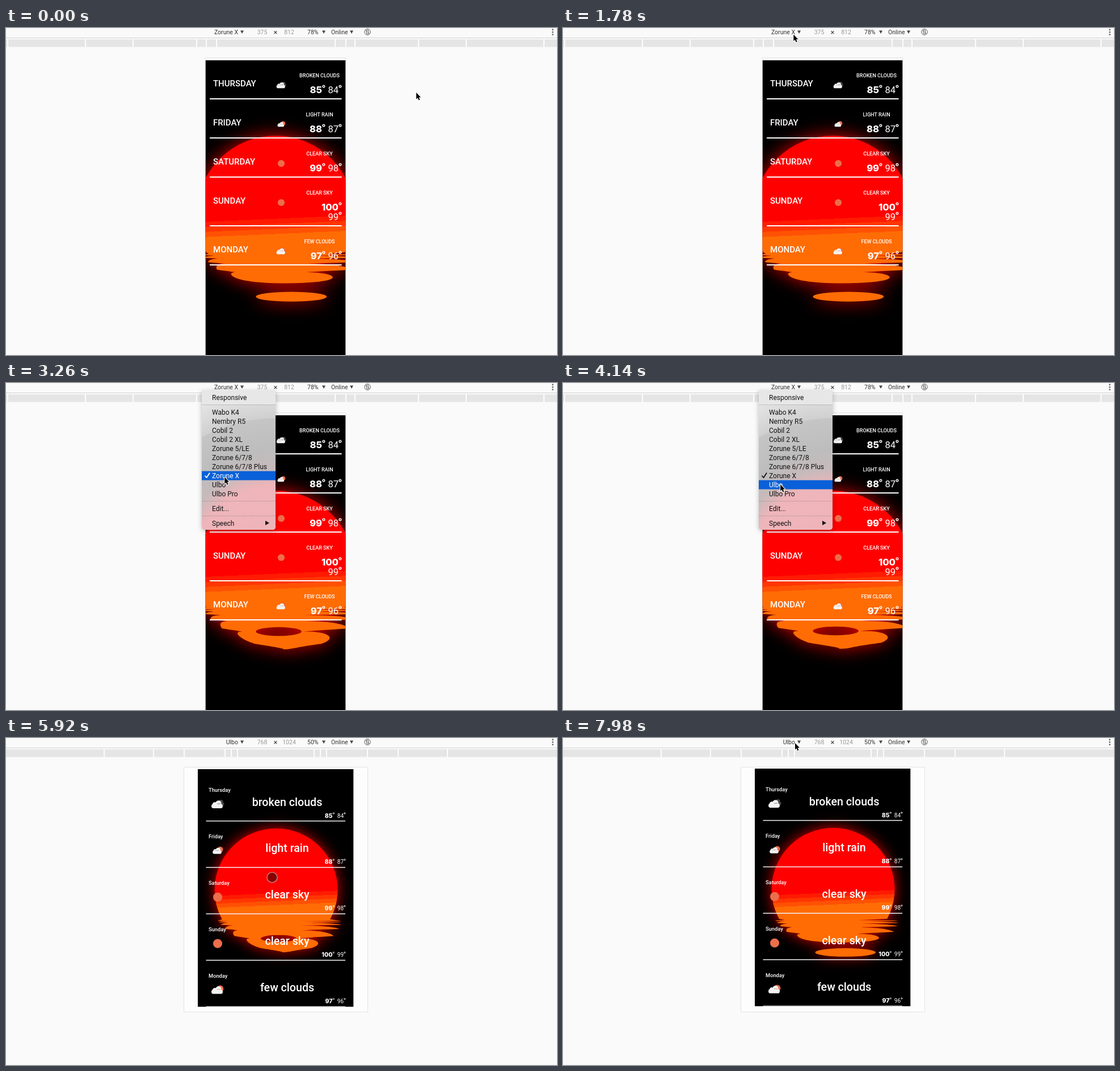
Animation of 971x577 px, one loop 8 s. Source, as an HTML page with a canvas:

```html
<!DOCTYPE html>
<html lang="en">
<head>
<meta charset="utf-8">
<title>Forecast at two screen sizes</title>
<style>
html, body { margin: 0; width: 100%; height: 100%; overflow: hidden; background: #fafafa; }
canvas { display: block; width: 100vw; height: 100vh; }
</style>
</head>
<body>
<canvas id="stage" width="971" height="577"></canvas>
<script>
const ctx = document.getElementById('stage').getContext('2d');
const LOOP = 8000, STEP = 147.9, LAST = 54;
const OPEN = 14, SWITCH = 30, SCROLL = 44;
const SANS = 'Roboto, Arial, sans-serif', HEAVY = 'Inter, Arial, sans-serif';

const phone = {
  label: 'Zorune X', w: '375', h: '812', zoom: '78%', scale: 0.656,
  page: [351.5, 57, 247, 530], frame: [351.5, 52.5, 247, 540],
  sun: { x: 475, y: 329, r: 139 }, rows: phoneRows
};
const tablet = {
  label: 'Ulbo', w: '768', h: '1024', zoom: '50%', scale: 0.42,
  page: [338, 55, 274.5, 419.5], frame: [313.5, 51.5, 324, 432],
  sun: { x: 476, y: 268, r: 108.5 }, rows: tabletRows
};
const breakpoints = [320, 375, 425, 768, 1024, 1440];
const days = [
  ['Thursday', 'broken clouds', 85, 84, 'dark'],
  ['Friday', 'light rain', 88, 87, 'rain'],
  ['Saturday', 'clear sky', 99, 98, 'sun'],
  ['Sunday', 'clear sky', 100, 99, 'sun'],
  ['Monday', 'few clouds', 97, 96, 'few']
];
const devices = ['Wabo K4', 'Nembry R5', 'Cobil 2', 'Cobil 2 XL', 'Zorune 5/LE', 'Zorune 6/7/8',
  'Zorune 6/7/8 Plus', 'Zorune X', 'Ulbo', 'Ulbo Pro'];
const menu = [['Responsive', 29.5], ...devices.map((d, i) => [d, 55.5 + i * 16]), ['Edit...', 225.5], ['Speech', 251.5]];

// Ripple cycles completed at a few steps; linear between them.
const cycles = [[0, 0.7], [7, 2.95], [16, 6.1], [28, 10], [40, 14.06], [47, 16.45], [54, 18.62]];
// Pointer moves: first step, last step, x, y.
const moves = [[1, 6, 370, 31], [9, 13, 413, 8], [17, 23, 383, 179], [30, 36, 469, 246], [49, 53, 409, 9]];

const clamp = u => Math.min(1, Math.max(0, u));
const smooth = u => u * u * (3 - 2 * u);

function ripplePhase(k) {
  const i = Math.max(1, cycles.findIndex(c => c[0] >= k));
  const [k0, c0] = cycles[i - 1], [k1, c1] = cycles[i];
  return (c0 + (c1 - c0) * (k - k0) / (k1 - k0)) % 1;
}
function pointerAt(k) {
  return moves.reduce(([px, py], [from, to, x, y]) => {
    const u = smooth(clamp((k - from) / (to - from)));
    return [px + (x - px) * u, py + (y - py) * u];
  }, [723, 114]);
}

function rect(x, y, w, h, fill) { ctx.fillStyle = fill; ctx.fillRect(x, y, w, h); }
function line(x1, x2, y, w, color) { rect(x1, y - w / 2, x2 - x1, w, color); }
function text(s, x, y, font, fill = '#fff', align = 'left') {
  ctx.font = font; ctx.fillStyle = fill; ctx.textAlign = align;
  ctx.fillText(s, x, y);
}
function disc(x, y, r, fill) {
  ctx.beginPath(); ctx.arc(x, y, r, 0, 7); ctx.fillStyle = fill; ctx.fill();
}
function stroke(points, color, width) {
  ctx.beginPath();
  points.forEach(p => ctx.lineTo(...p));
  ctx.strokeStyle = color; ctx.lineWidth = width; ctx.stroke();
}
function poly(points, fill, outline) {
  ctx.lineJoin = 'round';
  if (outline) stroke([...points, points[0]], outline, 2);
  ctx.beginPath();
  points.forEach(p => ctx.lineTo(...p));
  ctx.fillStyle = fill; ctx.fill();
}
function gradient(g, stops) {
  stops.forEach(s => g.addColorStop(...s));
  return g;
}
function arrowDown(x, y) { poly([[x - 3, y - 2.5], [x + 3, y - 2.5], [x, y + 3]], '#444'); }

// Lit water in sun radii: ripples start at HORIZON, widen as they drift down, and the lowest one breaks off.
const HORIZON = 0.47, GROW = 1.7;
const rippleDepth = s => HORIZON + 0.31 * GROW ** s;

function shoreAt(v, phase, bottom) {
  const s = Math.log((v - HORIZON) / 0.31) / Math.log(GROW) - phase;
  const f = s - Math.floor(s);
  const lit = f < 0.75 ? (f / 0.75) ** 0.4 : (1 - f) / 0.25;
  const half = Math.sqrt(Math.max(0, 1 - (0.97 * v) ** 2));
  const left = -half - 0.1 + 0.4 * (v - 0.48) + 0.2 * (1 - lit);
  const tip = Math.min(0.35, half + 0.25), right = tip + (half + 0.25 - tip) * lit;
  const round = Math.sqrt(Math.max(0, 1 - ((v - HORIZON) / (bottom - HORIZON)) ** 10));
  return [left, right].map(u => 0.1 + (u - 0.1) * round);
}

function sunPath({ x, y, r }, phase) {
  const joined = phase < 0.3, path = new Path2D(), left = [], right = [];
  const bottom = joined ? 1.007 + 0.15 * phase : 0.865 + 0.18 * Math.max(0, phase - 0.65);
  for (let v = 0.5; v < bottom; v += 0.004) {
    const [a, b] = shoreAt(v, phase, bottom);
    left.push([a, v]);
    right.unshift([b, v]);
  }
  path.arc(x, y, r, 0.5, Math.PI - 0.5, true);
  [...left, [0.1, bottom], ...right].forEach(([u, v]) => path.lineTo(x + u * r, y + v * r));
  path.closePath();
  const [u, v, rx, ry] = joined
    ? [0.04, rippleDepth(phase), 0.29, 0.056]
    : [0.2, 0.89 + 0.22 * phase, 0.82 - 0.53 * phase, 0.125 - 0.09 * phase];
  path.moveTo(x + (u + rx) * r, y + v * r);
  path.ellipse(x + u * r, y + v * r, rx * r, ry * r, 0, 0, 2 * Math.PI);
  return path;
}

function drawSun(sun, phase) {
  const { x, y, r } = sun, shades = 4, stops = [[0, '#ff0000']];
  for (let i = 0; i < shades; i++) {
    const at = 0.055 + i * 0.064, color = i => `rgb(255,${27 * i},${i})`;
    stops.push([at, color(i)], [at, color(i + 1)]);
  }
  ctx.save();
  ctx.shadowColor = '#d40000';
  ctx.shadowBlur = r * 0.23;
  ctx.fillStyle = gradient(ctx.createLinearGradient(x, y, x + 0.043 * r, y + r), stops);
  ctx.fill(sunPath(sun, phase), 'evenodd');
  ctx.restore();
}

function cloud(x, y, s, fill) {
  ctx.fillStyle = fill;
  ctx.beginPath();
  ctx.roundRect(x - 10 * s, y - s, 20 * s, 7.5 * s, 3.7 * s);
  ctx.arc(x - 4 * s, y, 4.2 * s, 0, 7);
  ctx.arc(x + 2.5 * s, y - 2 * s, 5.2 * s, 0, 7);
  ctx.fill();
}
function icon(kind, x, y, s) {
  const orange = '#ec6e4c', rain = kind === 'rain';
  if (kind === 'sun') return disc(x, y, 8 * s, orange);
  if (kind === 'dark') cloud(x + 4 * s, y - 2.5 * s, 0.75 * s, '#4a4848');
  else disc(x + 4.5 * s, y - 2.2 * s, (rain ? 5 : 5.8) * s, orange);
  cloud(x - s, y + 0.5 * s, rain ? 0.78 * s : s, '#f2f2f2');
}
function degrees(n, x, y, font, size) {
  text(n, x, y, font, '#fff', 'right');
  ctx.beginPath();
  ctx.arc(x + size * 0.16, y - size * 0.66, size * 0.1, 0, 7);
  ctx.strokeStyle = '#fff'; ctx.lineWidth = size * 0.08; ctx.stroke();
}

function phoneRows() {
  let top = 57;
  for (const [day, sky, high, low, kind] of days) {
    const wrap = high > 99 ? 17 : 0;
    text(day.toUpperCase(), 365, top + 46, '500 15px ' + SANS);
    text(sky.toUpperCase(), 552.5, top + 30, '500 9px ' + SANS, '#fff', 'center');
    icon(kind, 485, top + 44, 0.76);
    degrees(high, wrap ? 586 : 557, top + 58, '800 16.5px ' + HEAVY, 18);
    degrees(low, 586, top + 58 + wrap, '400 16.5px ' + SANS, 18);
    line(359, 591.5, top + 68 + wrap, 2, '#fff');
    top += 69 + wrap;
  }
}
function tabletRows() {
  days.forEach(([day, sky, high, low, kind], i) => {
    const top = 55 + i * 81.9;
    text(day, 357, top + 40, '500 9.3px ' + SANS);
    text(sky, 495.5, top + 64.5, '500 19.6px ' + SANS, '#fff', 'center');
    icon(kind, 373, top + 62, 1);
    degrees(high, 575.5, top + 85.5, '800 10.5px ' + HEAVY, 11.5);
    degrees(low, 595, top + 85.5, '400 10px ' + SANS, 11.5);
    line(352.5, 598, top + 91.5, 1.5, '#f4f4f4');
  });
}

function toolbar(view) {
  const font = '400 10.5px ' + SANS, ink = '#333', dim = '#999';
  rect(0, 17, 971, 1, '#cfcfcf');
  rect(0, 18, 971, 2, '#fcfcfc');
  rect(0, 20, 971, 13.5, '#e5e5e5');
  for (const b of breakpoints)
    for (const side of [-1, 1]) rect(Math.round(474.5 + side * b * view.scale / 2), 20, 2, 13.5, '#fdfdfd');
  text(view.label, 409, 10.5, font, ink, 'right');
  text(view.w, 451.5, 10.5, font, dim, 'center');
  text('×', 475, 12, '400 13px ' + SANS, ink, 'center');
  text(view.h, 499, 10.5, font, dim, 'center');
  text(view.zoom, 531, 10.5, font, ink);
  text('Online', 573, 10.5, font, ink);
  [416, 560, 609].forEach(x => arrowDown(x, 7));
  ctx.strokeStyle = '#666'; ctx.lineWidth = 1;
  ctx.beginPath(); ctx.arc(637, 7, 5.3, 0, 7); ctx.stroke();
  ctx.strokeRect(635.2, 3.8, 3.6, 6.4);
  stroke([[633, 3.5], [641, 10.5]], '#666', 1);
  [3, 7.3, 11.6].forEach(y => disc(963.5, y, 1.4, '#666'));
}

function drawMenu(py) {
  const { x, y } = phone.sun;
  ctx.save();
  ctx.shadowColor = 'rgba(0,0,0,.25)'; ctx.shadowBlur = 8; ctx.shadowOffsetY = 2;
  ctx.beginPath(); ctx.roundRect(345, 13, 130, 246, [0, 0, 5, 5]);
  ctx.fillStyle = '#dcdcdc'; ctx.fill();
  ctx.restore();
  ctx.save();
  ctx.clip();
  // The frosted panel shows the blurred page in rings around the sun.
  const frost = gradient(ctx.createRadialGradient(x, y, 0, x, y, 330), [[0, '#efb3b8'], [0.45, '#eeb5ba'],
    [0.54, '#c6babb'], [0.64, '#bdbdbd'], [0.805, '#c5c5c5'], [0.812, '#d0d0d0'], [0.9, '#dcdcdc'], [1, '#e8e8e8']]);
  rect(345, 13, 130, 246, frost);
  rect(345, 13, 130, 25, '#e7e7e7');
  [38.5, 208.5, 234.5].forEach(y => line(345, 475, y, 1, 'rgba(120,110,110,.3)'));
  const hot = menu.find(([, y]) => py >= y - 12 && py < y + 4);
  if (hot) rect(345, hot[1] - 12, 130, 16, '#0a60d8');
  for (const item of menu) {
    const [name, y] = item, ink = item === hot ? '#fff' : '#111';
    text(name, 363, y, '400 12px ' + SANS, ink);
    if (name === phone.label) stroke([[350.5, y - 4], [353.5, y - 0.5], [359, y - 9]], ink, 1.8);
  }
  poly([[457, 243], [457, 251], [464, 247]], '#111');
  ctx.restore();
}

function drawArrow(x, y) {
  poly([[0, 0], [0, 11.5], [2.6, 9.2], [4.5, 13.4], [6.4, 12.5], [4.6, 8.4], [8, 8.2]]
    .map(([dx, dy]) => [x + dx, y + dy]), '#000', '#fff');
}
function drawHand(x, y) {
  poly([[-3.5, -6], [-1.6, -6], [-1, -1.5], [3, -1.2], [5.2, 0.5], [4, 8], [-2, 8], [-6, 2], [-3, 2.5]]
    .map(([dx, dy]) => [x + dx, y + dy]), '#fff', '#111');
  [-0.5, 1.5, 3.3].forEach(dx => stroke([[x + dx, y + 3], [x + dx, y + 6]], '#111', 0.8));
}
function drawTouch(x, y) {
  disc(x, y, 9, 'rgba(20,0,0,.5)');
  ctx.strokeStyle = 'rgba(200,140,140,.85)'; ctx.lineWidth = 1.6; ctx.stroke();
}

function draw(k) {
  const view = k < SWITCH ? phone : tablet, open = k >= OPEN && k < SWITCH;
  const [x, y, w, h] = view.page;
  rect(0, 0, 971, 577, '#fafafa');
  toolbar(view);
  ctx.fillStyle = '#fdfdfd'; ctx.fillRect(...view.frame);
  ctx.strokeStyle = '#e3e3e3'; ctx.lineWidth = 1; ctx.strokeRect(...view.frame);
  if (k >= SCROLL && k < SCROLL + 6) rect(634, 54, 1, 420, '#e6e6e6');
  ctx.save();
  if (k >= SCROLL) ctx.translate(0, -1);
  ctx.beginPath(); ctx.rect(x, y, w, h); ctx.clip();
  rect(x, y, w, h, '#000');
  drawSun(view.sun, ripplePhase(k));
  view.rows();
  ctx.restore();

  const [px, py] = pointerAt(k);
  const inPage = px > x && px < x + w && py > y && py < y + h;
  if (open) drawMenu(py);
  if (inPage && !open) drawTouch(px, py);
  else if (!open && py > 20 && py < 34) drawHand(px, py);
  else drawArrow(px, py);
}

let shown = -1;
function tick(now) {
  const k = Math.min(LAST, Math.floor((now % LOOP + 8) / STEP));
  if (k !== shown) draw(shown = k);
  requestAnimationFrame(tick);
}
requestAnimationFrame(tick);
</script>
</body>
</html>
```
